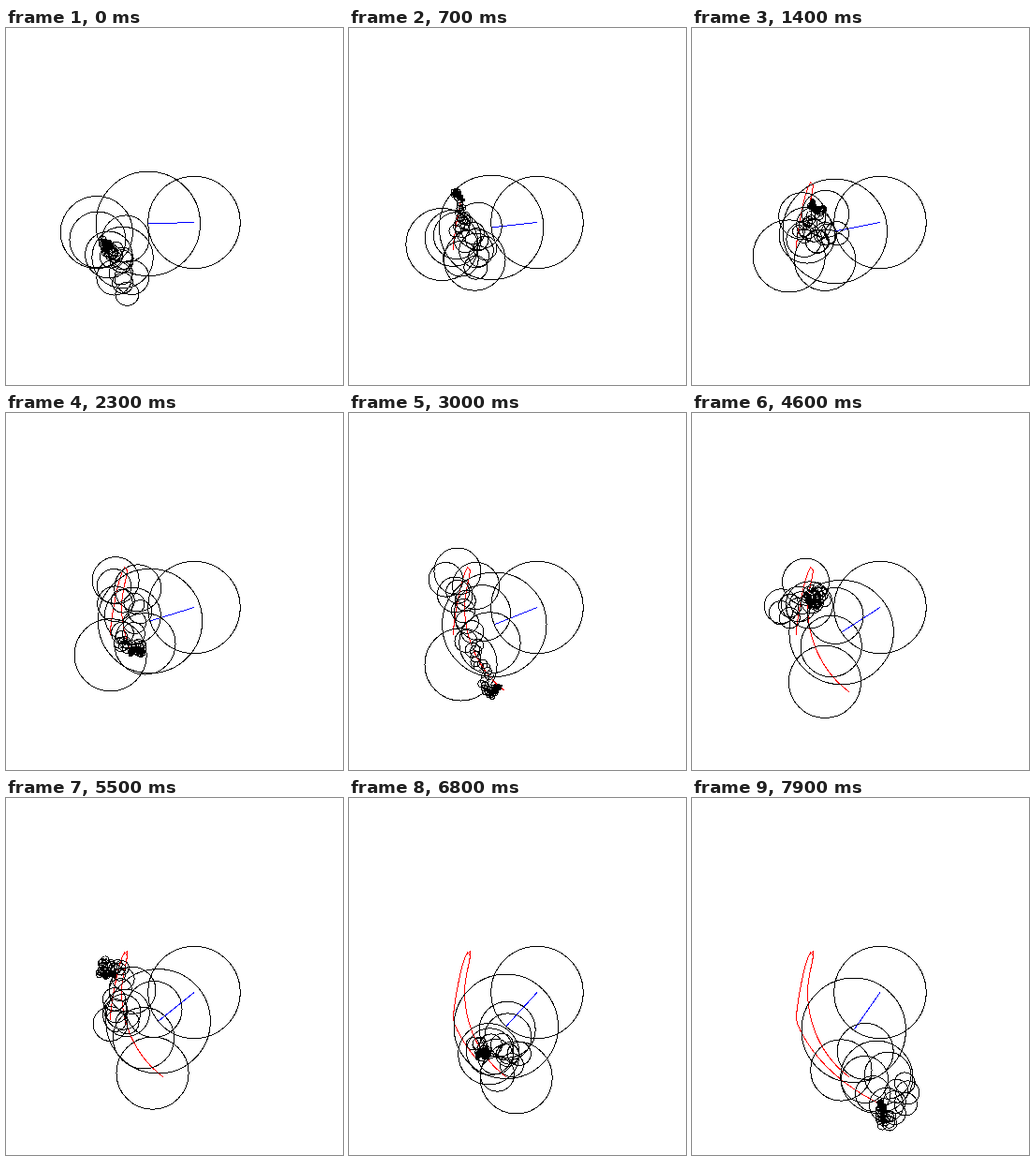
Animation, 360 px wide and 381 px high, one loop 8000 ms. Source, as an HTML page:

```html
<!DOCTYPE html>
<html lang="en">
<head>
<meta charset="utf-8">
<title>Epicycles</title>
<style>
  html, body { margin: 0; width: 100%; height: 100%; overflow: hidden; background: #fff; }
  svg { display: block; width: 360px; height: 381px; fill: none; stroke: #000; shape-rendering: crispEdges; }
</style>
</head>
<body>
<svg id="stage" viewBox="0 0 360 381">
  <defs>
    <!-- up and over the hook, back the same way, then down the tail -->
    <path id="route" d="M111 237 C113 213 122 164 128.5 163.5 C133 164 123 190 123.5 208 C124 250 146 283 170 299
      C146 283 124 250 123.5 208 C123 190 133 164 128.5 163.5 C122 164 113 213 111 237 C123 269 152 303 202 327"/>
  </defs>
  <path id="trace" stroke="#f00"/>
  <line id="hand" stroke="#00f"/>
</svg>
<script>
const STEPS = 80, STEP_MS = 100;
const RAD = Math.PI / 180, TURN = 0.675 * RAD;
const HUB = [201, 207.5];

const stage = document.getElementById("stage");
const route = document.getElementById("route");
const trace = document.getElementById("trace");
const hand = document.getElementById("hand");

function makeArm(r, f, angle) {
  return { f, x: r * Math.cos(angle), y: r * Math.sin(angle) };
}

function rotate(x, y, angle) {
  const c = Math.cos(angle), s = Math.sin(angle);
  return [x * c - y * s, x * s + y * c];
}

function armAt(arm, k) {
  return rotate(arm.x, arm.y, arm.f * TURN * k);
}

// radius, turns per cycle, starting angle in degrees
const mainArms = [
  [49.2, -1, 178.4], [55.7, -2, 170.5], [38.6, -4, 44.2], [32.7, 2, -144.5],
  [30, -5, -2], [25, 4, 137], [25, 1, 76], [18.8, -6, 0],
  [18.3, -3, 106], [12.5, 8, -112], [11, 10, -100]
].map(([r, f, deg]) => makeArm(r, f, deg * RAD));

// Gaussian elimination with a two-column right side
function solve(matrix, rhs) {
  const n = matrix.length, a = matrix.map((row, i) => [...row, ...rhs[i]]);
  for (let i = 0; i < n; i++) {
    for (let j = i + 1; j < n; j++) {
      const q = a[j][i] / a[i][i];
      for (let c = i; c < n + 2; c++) a[j][c] -= q * a[i][c];
    }
  }
  const out = [];
  for (let i = n - 1; i >= 0; i--) {
    out[i] = [n, n + 1].map((col, h) => {
      let v = a[i][col];
      for (let j = i + 1; j < n; j++) v -= a[i][j] * out[j][h];
      return v / a[i][i];
    });
  }
  return out;
}

// small arms, adjusted so that the whole chain ends on the pen
function fitArms(pen) {
  const sizes = [];
  for (let n = 3; n <= 36; n++) sizes.push([n, n < 7 ? 3 : 9 / (1 + (n / 14) ** 2.5)]);
  const small = sizes.flatMap(([n, r]) =>
    [n, -n].map(f => ({ r, ...makeArm(r, f, n * n * 2.4 + f) })));
  const gaps = pen.map(([px, py], k) => [...mainArms, ...small].reduce(([x, y], arm) => {
    const [dx, dy] = armAt(arm, k);
    return [x - dx, y - dy];
  }, [px - HUB[0], py - HUB[1]]));
  const kernel = pen.map((_, d) =>
    sizes.reduce((sum, [n, r]) => sum + 2 * r * r * Math.cos(n * TURN * d), 0));
  const matrix = pen.map((_, i) => pen.map((_, j) => kernel[Math.abs(i - j)] + (i === j ? 1 : 0)));
  const weights = solve(matrix, gaps);
  for (const arm of small) {
    weights.forEach(([wx, wy], k) => {
      const [dx, dy] = rotate(wx, wy, -arm.f * TURN * k);
      arm.x += arm.r ** 2 * dx;
      arm.y += arm.r ** 2 * dy;
    });
  }
  return small.sort((a, b) => Math.hypot(b.x, b.y) - Math.hypot(a.x, a.y));
}

const stride = route.getTotalLength() / (STEPS - 1);
const pen = Array.from({ length: STEPS }, (_, k) => {
  const p = route.getPointAtLength(k * stride);
  return [p.x, p.y];
});
const arms = [...mainArms, ...fitArms(pen)];

function set(el, attrs) {
  for (const name in attrs) el.setAttribute(name, attrs[name]);
}

const circles = arms.map(arm => {
  const el = document.createElementNS("http://www.w3.org/2000/svg", "circle");
  set(el, { r: Math.hypot(arm.x, arm.y) });
  return stage.appendChild(el);
});

function draw(k) {
  let [x, y] = HUB;
  arms.forEach((arm, i) => {
    set(circles[i], { cx: x, cy: y });
    const [dx, dy] = armAt(arm, k);
    if (i === 0) set(hand, { x1: x, y1: y, x2: x + dx, y2: y + dy });
    x += dx;
    y += dy;
  });
  set(trace, { d: "M" + pen.slice(0, k + 1).join("L") });
}

const start = performance.now();
let shown = -1;
function tick() {
  const k = Math.floor((performance.now() - start) / STEP_MS) % STEPS;
  if (k !== shown) draw(shown = k);
  requestAnimationFrame(tick);
}
tick();
</script>
</body>
</html>
```
